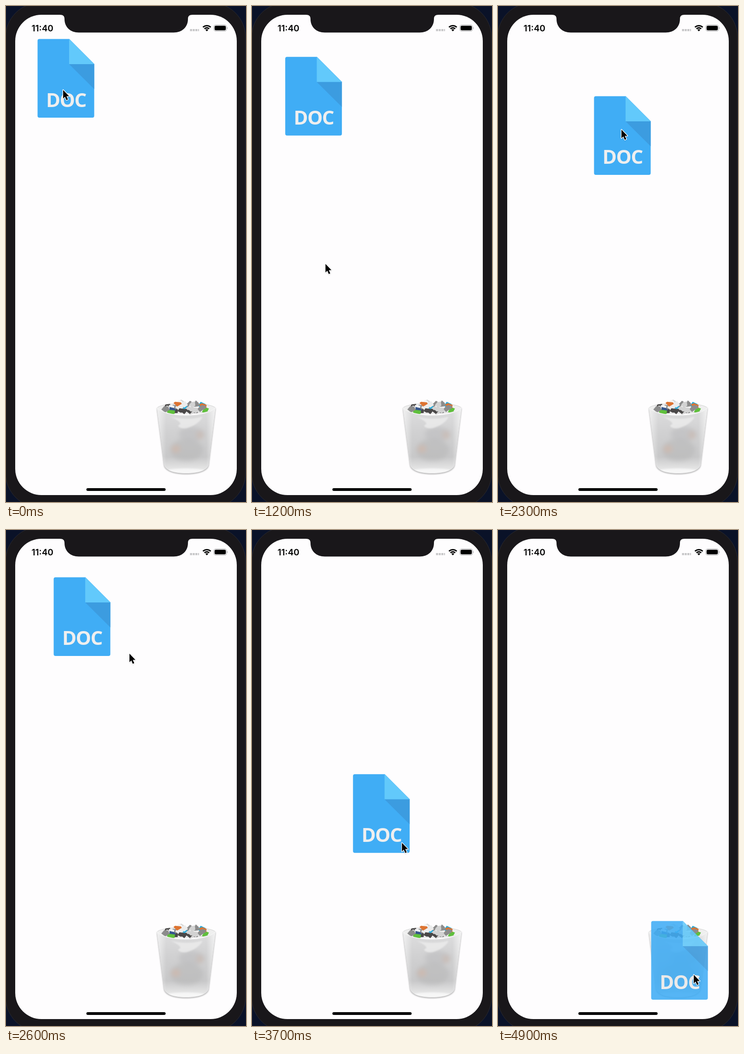
An HTML page that plays this animation: 521 by 1075 pixels, repeating every 5 s.

```html
<!DOCTYPE html>
<html lang="en">
<head>
<meta charset="utf-8">
<title>Drag to bin</title>
<style>
  html, body { margin: 0; width: 100%; height: 100%; overflow: hidden; background: #0a1228; }
  svg { display: block; width: 100%; height: 100%; }
  .time { font: 600 19px Inter, "Liberation Sans", sans-serif; }
  .label { font: 700 42px "Open Sans", "Noto Sans", sans-serif; letter-spacing: -1.5px; fill: #efefef; text-anchor: middle; }
</style>
</head>
<body>
<svg viewBox="0 0 521 1075">
  <defs>
    <linearGradient id="plastic" x1="0" y1="0" x2="0" y2="1">
      <stop offset="0" stop-color="#dededf"/>
      <stop offset=".4" stop-color="#d0d0d1"/>
      <stop offset=".75" stop-color="#c8c8c9"/>
      <stop offset="1" stop-color="#f0f0f0"/>
    </linearGradient>
    <linearGradient id="sides">
      <stop offset="0" stop-color="#fff" stop-opacity=".6"/>
      <stop offset=".16" stop-color="#fff" stop-opacity="0"/>
      <stop offset=".84" stop-color="#fff" stop-opacity="0"/>
      <stop offset="1" stop-color="#fff" stop-opacity=".65"/>
    </linearGradient>
    <filter id="soft" x="-50%" y="-50%" width="200%" height="200%"><feGaussianBlur stdDeviation="5"/></filter>
    <filter id="glow" x="-30%" y="-30%" width="160%" height="160%"><feGaussianBlur stdDeviation="1.8"/></filter>
    <path id="pail" d="M327.5 870C333 880 360 887 391 887S450 880 455 869L440 994C438 1006 418 1013 391 1013S345 1006 343 994Z"/>
    <clipPath id="inPail"><use href="#pail"/></clipPath>
    <path id="arrow" d="M1 2V20.500L5 16.700L8.200 24L11.400 22.600L8.300 15.500H14Z"/>
  </defs>

  <!-- phone -->
  <rect x="-1" y="-7" width="521" height="1094" rx="75" fill="#19171a" stroke="#2b2a2f"/>
  <rect x="20" y="19" width="481" height="1041" rx="57" fill="#fefdfe"/>
  <path d="M117 18V19C124 19 127 22 127 28C127 46 140 57.500 158 57.500H364C382 57.500 395 46 395 28C395 22 398 19 405 19V18Z" fill="#19171a"/>

  <!-- status bar -->
  <text class="time" x="55.5" y="54.5">11:40</text>
  <path d="M401.500 52.300H421" stroke="#c5c5c7" stroke-width="4.400" stroke-dasharray="4.400 1.400" transform="translate(-2)"/>
  <g fill="none" stroke="#000" stroke-width="2.9">
    <path d="M427.600 46.100A11.800 11.800 0 0 1 444.400 46.100"/>
    <path d="M430.900 49.400A7.200 7.200 0 0 1 441.100 49.400"/>
  </g>
  <path d="M436 54.900L432.900 51.600A4.400 4.400 0 0 1 439.100 51.600Z"/>
  <rect x="451" y="41" width="28" height="13.6" rx="4.3" fill="none" stroke="#a3a3a5"/>
  <rect x="452.8" y="42.8" width="24.4" height="10" rx="2.7"/>
  <path d="M480.400 45.600Q482.200 47.800 480.400 50Z" fill="#98989a"/>
  <rect x="174.5" y="1045" width="172" height="6" rx="3"/>

  <!-- bin -->
  <use href="#pail" fill="#666" opacity=".6" filter="url(#glow)" y="1.5"/>
  <ellipse cx="391.2" cy="872" rx="63.5" ry="11" fill="#efefef" stroke="#d2d2d2"/>
  <g id="papers"></g>
  <use href="#pail" fill="url(#plastic)"/>
  <g clip-path="url(#inPail)">
    <g filter="url(#soft)">
      <ellipse cx="392" cy="962" rx="36" ry="24" fill="#b5b5b6" opacity=".5"/>
      <ellipse cx="403" cy="928" rx="28" ry="16" fill="#bdbdbe" opacity=".6"/>
      <ellipse cx="369" cy="960" rx="10" ry="8" fill="#d3b8a8" opacity=".6"/>
      <ellipse cx="421" cy="930" rx="8" ry="9" fill="#d0baac" opacity=".5"/>
    </g>
    <path d="M357 890Q392 899 427 890Q419 907 392 915Q377 917 373 909Q389 905 357 890Z" fill="#eee" opacity=".75" filter="url(#glow)"/>
    <use href="#pail" fill="url(#sides)"/>
    <ellipse cx="391" cy="1007" rx="40" ry="5" fill="#fff" opacity=".6" filter="url(#glow)"/>
  </g>
  <path d="M327.500 870C333 880 360 887 391 887S450 880 455 869" fill="none" stroke="#f4f4f4" stroke-width="1.5"/>

  <!-- document -->
  <g id="doc">
    <path d="M4 0H69L123 54V166.500Q123 170.500 119 170.500H4Q0 170.500 0 166.500V4Q0 0 4 0Z" fill="#40adf5"/>
    <path d="M68.500 0L123 54.500H68.500Z" fill="#62c9fb"/>
    <path d="M68.500 54.500H123V108.500Z" fill="#3c9ce0"/>
    <text class="label" x="61.8" y="147">DOC</text>
  </g>

  <!-- pointer -->
  <g id="cursor">
    <use href="#arrow" y="1.5" opacity=".35" filter="url(#glow)"/>
    <use href="#arrow" stroke="#fff" stroke-width="2.6" stroke-linejoin="round"/>
    <use href="#arrow"/>
  </g>
</svg>
<script>
const $ = id => document.getElementById(id);
const LOOP = 5000, STEP = 100, LAG = 25, RETURN = 600, FADE = 4900;
const HOME = [68, 71], BIN = [332, 847];

// Crumpled paper: random five-sided scraps heaped under an arch
let seed = 11;
const rand = (lo, hi) => {
  seed = seed * 16807 % 2147483647;
  return lo + (hi - lo) * seed / 2147483647;
};
const greys = ["#ececec", "#4a4848", "#d2d2d2", "#8c8c8c", "#f4f4f4"];
const inks = ["#2aa9d6", "#5fbf3c", "#dd7432", "#35558c"];

for (let i = 0; i < 44; i++) {
  const side = rand(-1, 1);
  const cx = 387 + side * 45, cy = rand(860 + side * side * 6, 879);
  const points = [];
  for (let a = 0; a < 5; a++) {
    const angle = (a + rand(0, 0.8)) * Math.PI * 0.4;
    points.push([cx + rand(5, 11) * Math.cos(angle), cy + rand(4, 9) * Math.sin(angle)]);
  }
  const scrap = document.createElementNS("http://www.w3.org/2000/svg", "polygon");
  scrap.setAttribute("points", points.join(" "));
  scrap.setAttribute("fill", i % 6 === 5 ? inks[(i - 5) / 6 % 4] : greys[i % 5]);
  $("papers").append(scrap);
}

const mix = (a, b, u) => a.map((v, i) => v + (b[i] - v) * u);
const smooth = u => u * u * (3 - 2 * u);
const clamp = u => Math.min(1, Math.max(0, u));

const moves = [
  { from: 0, to: 800, end: [158.5, 557] },
  { from: 1200, to: 1700, end: [127, 142] },
  { from: 1780, to: 2280, end: [267, 266] },
  { from: 2600, to: 2980, end: [166, 195] },
  { from: 3000, to: 4186, end: [416, 954] },
  { from: 4250, to: 4500, end: [424, 962] }
];
const drags = [
  { grab: 130, drop: 800, rest: HOME },
  { grab: 1780, drop: 2300, rest: HOME },
  { grab: 3000, drop: 4250, rest: BIN }
];

function cursorAt(t) {
  return moves.reduce(
    (p, m) => mix(p, m.end, smooth(clamp((t - m.from) / (m.to - m.from)))), [123, 180]);
}

// While held the document trails the pointer; once dropped it glides to rest
function docAt(t) {
  const drag = drags.findLast(d => d.grab <= t);
  if (!drag) return HOME;
  const held = Math.max(drag.grab, Math.min(t, drag.drop) - LAG);
  const grip = cursorAt(drag.grab);
  const pos = cursorAt(held).map((v, i) => HOME[i] + v - grip[i]);
  const left = 1 - clamp((t - drag.drop) / RETURN);
  return mix(pos, drag.rest, 1 - left * left);
}

function place(id, [x, y]) {
  $(id).setAttribute("transform", `translate(${x} ${y})`);
}

const start = performance.now();
function draw() {
  const ms = (performance.now() - start) % LOOP;
  const t = Math.floor(ms / STEP) * STEP;
  place("doc", docAt(t).map(v => v + 0.5));
  place("cursor", cursorAt(t));
  $("doc").setAttribute("opacity", t >= FADE ? 0.88 : 1);
  requestAnimationFrame(draw);
}
draw();
</script>
</body>
</html>
```
